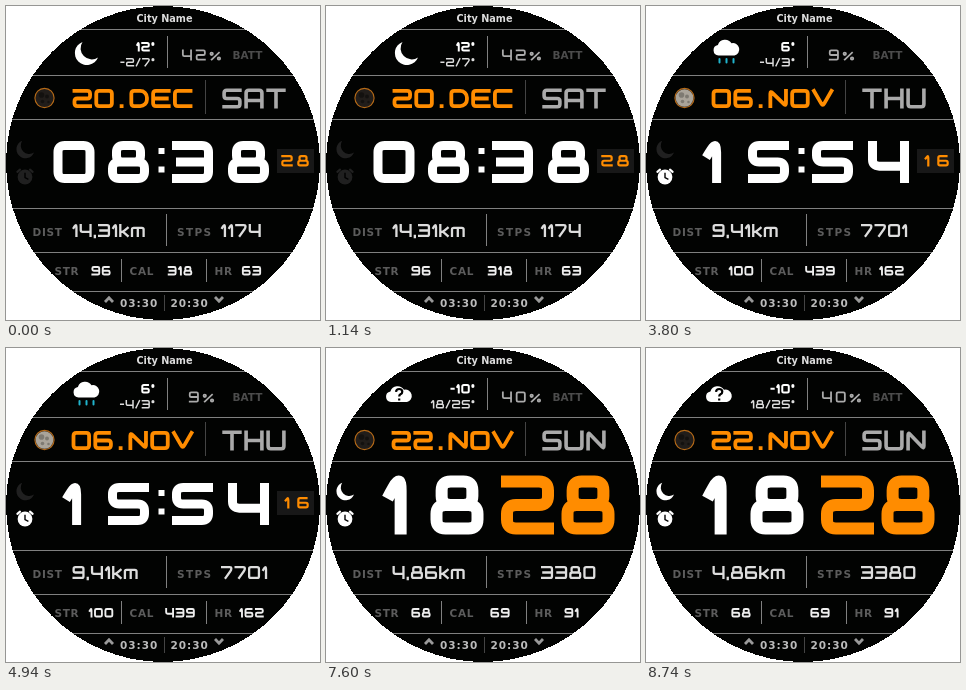
Recreate the animation shown at these times as an HTML page. Size 314x314 px, loop 9.5 s.

```html
<!DOCTYPE html>
<html lang="en">
<head>
<meta charset="utf-8">
<title>Watch face</title>
<style>
  html, body { margin: 0; width: 100%; height: 100%; overflow: hidden; background: #fff; }
  svg { display: block; width: 314px; height: 314px; }
  text { font: bold 10.5px "DejaVu Sans", sans-serif; letter-spacing: .7px; fill: #5c5c5c; }
  .city { font-size: 9.7px; letter-spacing: 0; fill: #ddd; }
  .batt { letter-spacing: 0; fill: #4c4c4c; }
  .steps { letter-spacing: 1.4px; }
  .span { letter-spacing: 1px; fill: #bbb; }
</style>
</head>
<body>
<svg viewBox="0 0 314 314">
  <rect width="314" height="314" fill="#020302"/>
  <g fill="none" stroke="#808080">
    <path d="M0 23.5H314M0 69.5H314M0 113.5H314M0 202.5H314M0 246.5H314M0 285.5H314"/>
    <path d="M161.5 30V62M160.5 208V240M115.5 253V276M200.5 253V276"/>
    <path d="M199.5 74V108M158.5 289V305" stroke="#444"/>
    <path d="M99 296L103 291.8L107 296M209 291L213 295.2L217 291" stroke="#999" stroke-width="2.8"/>
  </g>
  <text class="city" x="158.5" y="15.5" text-anchor="middle">City Name</text>
  <text class="batt" x="226.5" y="53">BATT</text>
  <text x="26.5" y="229.5">DIST</text>
  <text class="steps" x="171" y="229.5">STPS</text>
  <text x="48.5" y="268.5">STR</text>
  <text x="123.5" y="268.5">CAL</text>
  <text x="208.5" y="268.5">HR</text>
  <text class="span" x="114" y="300.5">03:30</text>
  <text class="span" x="164.5" y="300.5">20:30</text>
  <g id="live"></g>
  <path d="M0 0H314V314H0ZM0 157A157 157 0 0 0 314 157A157 157 0 0 0 0 157Z" fill="#fff" fill-rule="evenodd" shape-rendering="crispEdges"/>
</svg>
<script>
const HOLD = 1900;
const ORANGE = '#ff8c00', WHITE = '#fff', DIM = '#202020';

// Width factor, then strokes on a 0-8 grid (xy pairs).
const BOX = '00 80 88 08 z';
const GLYPHS = {
  0: [1, BOX],
  1: [.42, '02 50 80 88'],
  2: [1, '00 80 84 04 08 88'],
  3: [1, '00 80 88 08', '14 84'],
  4: [1, '00 05 85', '80 88'],
  5: [1, '80 00 04 84 88 08'],
  6: [1, '70 00 08 88 84 04'],
  7: [.95, '00 80 82 38'],
  8: [1, '10 70 74 14 z', '04 84 88 08 z'],
  9: [1, '84 04 00 80 88 08'],
  A: [1, '08 00 80 88', '05 85'],
  C: [1, '80 00 08 88'],
  D: [1, '00 60 82 86 68 08 z'],
  E: [1, '80 00 08 88', '04 74'],
  H: [1, '00 08', '80 88', '04 84'],
  N: [1, '08 00 88 80'],
  O: [1, BOX],
  S: [1, '80 00 04 84 88 08'],
  T: [1, '00 80', '40 48'],
  U: [1, '00 08 88 80'],
  V: [1.1, '00 48 80'],
  W: [1.35, '00 28 40 68 80'],
  k: [.8, '00 08', '05 35 82', '35 88'],
  m: [1.15, '08 02 82 88', '42 48'],
  '.': [.56, '48 48'],
  ',': [0, '08 09'],
  '-': [.5, '04 84'],
  '/': [.6, '08 80'],
  '%': [1.15, '72 18', '02 22 24 04 z', '66 86 88 68 z'],
  '°': [.38, '00 80 82 02 z'],
  ' ': [.25]
};

const STATES = [
  { time: '0838', sec: '28', date: '20.DEC', day: 'SAT', sky: 'moon', hi: '12°', lo: '-2/7°',
    batt: '42%', phase: 0, night: 0, alarm: 0, dist: '14,31km', steps: '1174', str: '96', cal: '318', hr: '63' },
  { time: '1223', sec: '58', date: '1 6.OCT', day: 'WED', sky: 'snow', hi: '--', lo: '--',
    batt: '44%', phase: .5, night: 1, alarm: 1, dist: '2,71km', steps: '8658', str: '96', cal: '122', hr: '143' },
  { time: '1554', sec: '16', date: '06.NOV', day: 'THU', sky: 'rain', hi: '6°', lo: '-4/3°',
    batt: '9%', phase: 1, night: 0, alarm: 1, dist: '9,41km', steps: '7701', str: '100', cal: '439', hr: '162' },
  null,
  { time: '1828', date: '22.NOV', day: 'SUN', sky: 'unknown', hi: '-10°', lo: '18/25°',
    batt: '40%', phase: 0, night: 1, alarm: 1, dist: '4,86km', steps: '3380', str: '68', cal: '69', hr: '91' }
];
STATES[3] = { ...STATES[2], sec: undefined, skyShift: -7 };

// Polyline with softened corners.
function softPath(pts, closed, r) {
  const n = pts.length;
  const toward = (a, b) => {
    const len = Math.hypot(b[0] - a[0], b[1] - a[1]) || 1;
    const k = Math.min(r, len / 2) / len;
    return [a[0] + (b[0] - a[0]) * k, a[1] + (b[1] - a[1]) * k];
  };
  const fmt = p => p.map(v => v.toFixed(2)).join(' ');
  let d = '';
  pts.forEach((p, i) => {
    const op = d ? 'L' : 'M';
    if (!closed && (i === 0 || i === n - 1)) { d += op + fmt(p); return; }
    const before = pts[(i + n - 1) % n], after = pts[(i + 1) % n];
    d += op + fmt(toward(p, before)) + 'Q' + fmt(p) + ' ' + fmt(toward(p, after));
  });
  return d + (closed ? 'Z' : '');
}

const glyphWidth = (ch, f) => Math.max(f.s, GLYPHS[ch][0] * f.w);

function glyph(ch, x, y, f) {
  const w = glyphWidth(ch, f);
  return GLYPHS[ch].slice(1).map(stroke => {
    const marks = stroke.split(' ');
    const closed = marks.at(-1) === 'z';
    if (closed) marks.pop();
    const pts = marks.map(m => [
      x + f.s / 2 + m[0] / 8 * (w - f.s),
      y + f.s / 2 + m[1] / 8 * (f.h - f.s)
    ]);
    return softPath(pts, closed, f.s * .75);
  }).join('');
}

const inked = (d, f, color) =>
  `<path d="${d}" fill="none" stroke="${color}" stroke-width="${f.s}" stroke-linecap="square"/>`;

// align: 0 left, .5 centre, 1 right
function word(str, x, y, f, color, align = 0) {
  const chars = [...str];
  const total = chars.reduce((sum, c) => sum + glyphWidth(c, f) + f.gap, -f.gap);
  let pen = x - total * align, d = '';
  for (const c of chars) {
    d += glyph(c, pen, y, f);
    pen += glyphWidth(c, f) + f.gap;
  }
  return inked(d, f, color);
}

const centred = (ch, cx, y, f, color) => word(ch, cx, y, f, color, .5);

const FONT = {
  clock: { w: 41, h: 42, s: 9, gap: 0 },
  huge: { w: 53, h: 59, s: 12, gap: 0 },
  date: { w: 19.4, h: 19, s: 3.8, gap: 2.4 },
  day: { w: 19.4, h: 20, s: 3.6, gap: 2.6 },
  value: { w: 12.1, h: 13, s: 2.3, gap: 2 },
  small: { w: 8.8, h: 9.5, s: 1.9, gap: 1.6 },
  high: { w: 8.5, h: 9.5, s: 2, gap: 1.5 },
  low: { w: 8.2, h: 8.5, s: 1.5, gap: 1.5 },
  batt: { w: 10, h: 11, s: 1.8, gap: 3.8 },
  sec: { w: 11.5, h: 11.5, s: 2.2, gap: 0 }
};

const at = (x, y, body, scale = 1) => `<g transform="translate(${x} ${y}) scale(${scale})">${body}</g>`;

const crescent = color =>
  `<path d="M-3 -11.6A12 12 0 1 0 12.5 4A11.2 11.2 0 0 1 -3 -11.6Z" fill="${color}"/>`;

const cloud = color =>
  `<path d="M-8 8A5.3 5.3 0 0 1 -8.6 -2.5A7.6 7.6 0 0 1 5 -4.2A6.2 6.2 0 0 1 8 8Z" fill="${color}"/>`;

const SKY = {
  moon: () => at(79.5, 47.5, crescent(WHITE)),
  snow: () => at(80, 42.5, cloud('#e4e4e4') +
    '<g fill="#ddd"><circle cx="-6" cy="11" r="1.5"/><circle cy="14.5" r="1.5"/><circle cx="6.5" cy="11" r="1.5"/></g>'),
  rain: () => at(80.5, 41.5, cloud(WHITE) +
    '<path d="M-7 11.5V15M0 11.5V15M7 11.5V15" stroke="#20b4cc" stroke-width="2" stroke-linecap="round"/>'),
  unknown: () => at(73, 46, cloud(WHITE) +
    '<path d="M-3 -2.2Q-2.8 -5 .2 -5Q3.3 -5 3.3 -2.3Q3.3 -.6 1.5 .3Q.2 1 .2 2.6M.2 4.4V6.4" fill="none" stroke="#000" stroke-width="2.2"/>')
};

function moonPhase(phase) {
  const lit = phase === 1 ? '<circle r="8.8" fill="#aaa49a"/>'
    : phase ? '<path d="M1 -8.8A8.8 8.8 0 0 0 1 8.8Q4 0 1 -8.8Z" fill="#777168"/>' : '';
  const spots = `<g fill="#000" opacity="${phase ? .25 : .4}"><circle cx="-3" cy="-3" r="2.8"/>` +
    '<circle cx="2.5" cy="-1.5" r="2"/><circle cx="-2" cy="3.5" r="1.8"/><circle cx="4" cy="4" r="1.3"/></g>';
  return at(38.5, 92, '<circle r="9.6" fill="#211d1a" stroke="#b56a18" stroke-width="1.1"/>' + lit + spots);
}

const alarm = color => at(19, 171,
  `<path d="M-7.6 -5.2L-5 -7.4M7.6 -5.2L5 -7.4" stroke="${color}" stroke-width="2.2" stroke-linecap="round"/>` +
  `<circle r="7.4" fill="${color}"/><path d="M0 -4.2V.6L3.4 2.4" fill="none" stroke="#000" stroke-width="1.4"/>`);

function clock(s) {
  const [a, b, c, d] = s.time;
  if (!s.sec) {
    const put = (ch, x, color) => centred(ch, x, 127.5, FONT.huge, color);
    return put(a, 69.5, WHITE) + put(b, 131, WHITE) + put(c, 201.5, ORANGE) + put(d, 262, ORANGE);
  }
  const put = (ch, x) => centred(ch, x, 135, FONT.clock, WHITE);
  return put(a, a === '1' ? 66.5 : 68) + put(b, 122.5) + put(c, 186.5) + put(d, 242.5) +
    '<path d="M152.5 142h6v6h-6zM152.5 160.5h6v6h-6z" fill="#fff"/>' +
    '<rect x="271" y="143" width="37" height="24" fill="#181818"/>' +
    centred(s.sec[0], 281, 149, FONT.sec, ORANGE) + centred(s.sec[1], 297, 149, FONT.sec, ORANGE);
}

function face(s) {
  return at(s.skyShift || 0, 0, SKY[s.sky]()) +
    word(s.hi, 148.5, 36, FONT.high, WHITE, 1) +
    word(s.lo, 148.5, 52, FONT.low, '#ddd', 1) +
    word(s.batt, 195.5, 43.5, FONT.batt, '#aaa', .5) +
    moonPhase(s.phase) +
    word(s.date, 126.5, 83, FONT.date, ORANGE, .5) +
    word(s.day, 248, 82.5, FONT.day, '#aaa', .5) +
    at(18.5, 143.5, crescent(s.night ? WHITE : DIM), .76) +
    alarm(s.alarm ? WHITE : DIM) +
    clock(s) +
    word(s.dist, 66.5, 218, FONT.value, '#ddd') +
    word(s.steps, 215, 218, FONT.value, '#ddd') +
    word(s.str, 95, 260, FONT.small, '#eee', .5) +
    word(s.cal, 174, 260, FONT.small, '#eee', .5) +
    word(s.hr, 245.5, 260, FONT.small, '#eee', .5);
}

const live = document.getElementById('live');
const faces = STATES.map(face);
let shown = -1;

function tick() {
  const i = Math.floor(performance.now() / HOLD) % faces.length;
  if (i !== shown) live.innerHTML = faces[shown = i];
  requestAnimationFrame(tick);
}
tick();
</script>
</body>
</html>
```
